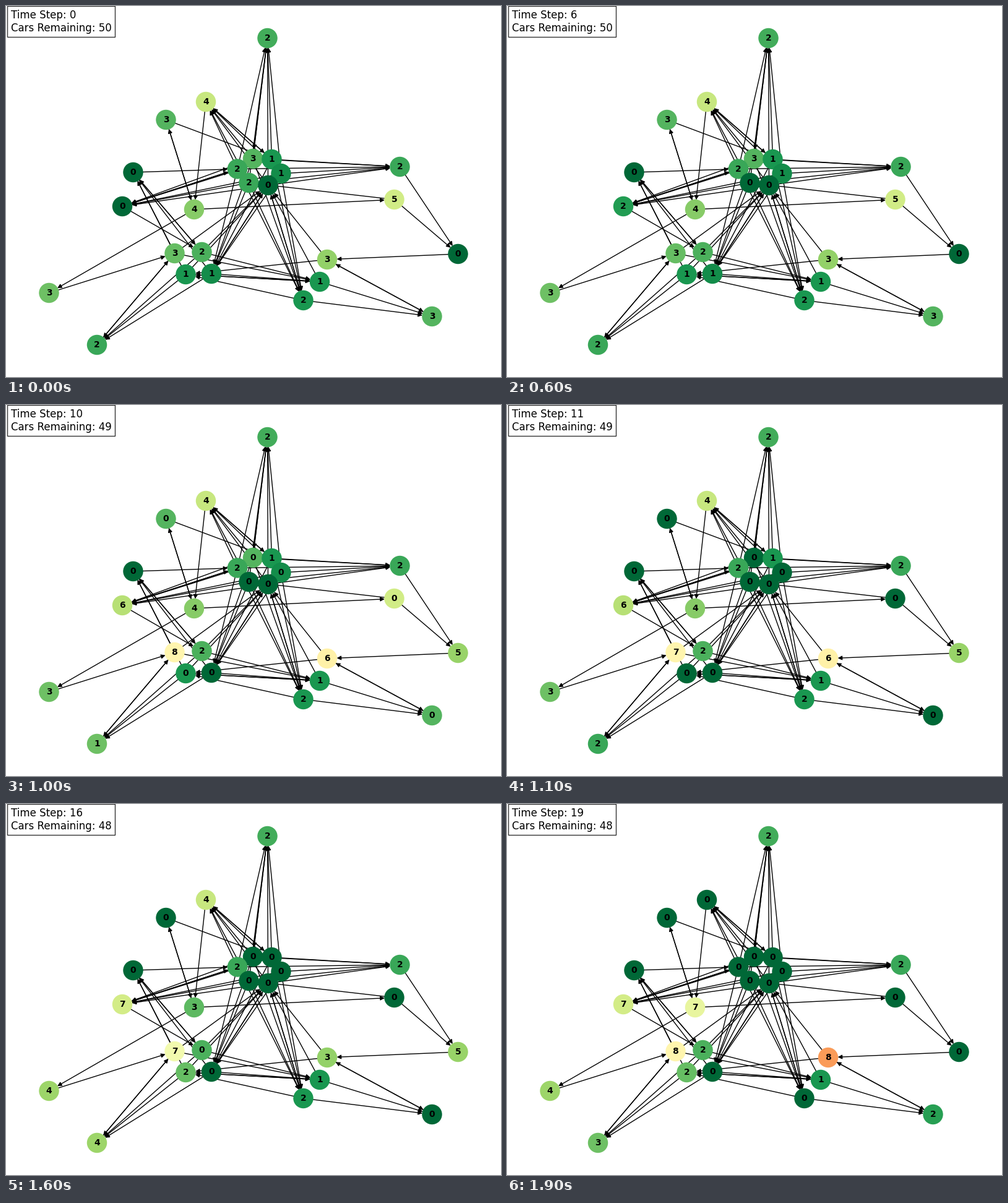
Recreate the animation shown at these times as a matplotlib script. Size 800x600 px, loop 2000 ms.

```python
import matplotlib.pyplot as plt
from matplotlib.animation import FuncAnimation
from matplotlib.patches import FancyArrowPatch

STEPS = 20
NODE_SIZE = 500

# name: (x, y, capacity, cars at the start)
NODES = {
    "A": (422.5, 52, 13, 2), "B": (323, 155, 11, 4),
    "C": (258.5, 184, 17, 3), "D": (205.5, 269, 10, 0),
    "E": (188, 324, 18, 0), "F": (304, 329, 16, 4),
    "G": (399, 247, 17, 3), "H": (429.5, 248, 10, 1),
    "I": (374, 263.5, 14, 2), "J": (444.5, 271, 13, 1),
    "K": (392.5, 286, 14, 2), "L": (423.5, 290, 10, 0),
    "M": (636.5, 260, 14, 2), "N": (627.5, 313, 13, 5),
    "O": (730.5, 401, 18, 0), "P": (519, 410, 11, 3),
    "Q": (507, 446, 10, 1), "R": (480.5, 476, 20, 2),
    "S": (688.5, 502, 17, 3), "T": (272.5, 400, 15, 3),
    "U": (316.5, 398, 12, 2), "V": (290.5, 434, 10, 1),
    "W": (332, 433, 13, 1), "X": (69.5, 464, 14, 3),
    "Y": (147, 548, 14, 2),
}

# sources -> targets, every source joined to every target
ROADS = [
    ("GHIJKL", "ABEMRW"), ("TUVW", "DYQL"), ("PQR", "SVL"),
    ("A", "G"), ("B", "HF"), ("C", "HF"), ("D", "IU"), ("E", "IU"),
    ("F", "CNX"), ("M", "O"), ("N", "OK"), ("O", "P"), ("S", "P"),
    ("X", "T"), ("Y", "T"),
]

# step: new car counts at the nodes that change
MOVES = {
    5: "K0 E2",
    7: "X0 T5",
    8: "W0 Y3",
    10: "C0 G0 J0 S0 N0 V0 E6 T8 X3 Y1 P6 O5",
    11: "T7 Y2",
    12: "F3 X4 P4 V1",
    14: "H0 E7",
    15: "P3 V2",
    16: "U0 Y4",
    18: "B0 I0 R0 O0 F7 U2 S2 P8 Y3 T8",
}


def run_model():
    cars = {name: node[3] for name, node in NODES.items()}
    states = []
    for step in range(STEPS):
        for move in MOVES.get(step, "").split():
            cars[move[0]] = int(move[1:])
        states.append(dict(cars))
    return states


def remaining(step):
    return 50 - (step >= 7) - (step >= 12)


def loads(step):
    # leaving cars still count towards the colour for one step
    now, before = STATES[step], STATES[max(step - 1, 0)]
    return [max(now[n], before[n]) / NODES[n][2] for n in NODES]


STATES = run_model()

fig = plt.figure(figsize=(8, 6), dpi=100, facecolor="white")
ax = fig.add_axes([0, 0, 1, 1])
ax.set_xlim(0, 800)
ax.set_ylim(600, 0)
ax.axis("off")

margin = NODE_SIZE ** 0.5 / 2
for sources, targets in ROADS:
    for a in sources:
        for b in targets:
            if a != b:
                ax.add_patch(FancyArrowPatch(
                    NODES[a][:2], NODES[b][:2], arrowstyle="-|>",
                    mutation_scale=10, shrinkA=margin, shrinkB=margin,
                    linewidth=1, color="black", zorder=1))

dots = ax.scatter([n[0] for n in NODES.values()],
                  [n[1] for n in NODES.values()],
                  s=NODE_SIZE, c=loads(0), cmap="RdYlGn_r",
                  vmin=0, vmax=1, linewidths=1, zorder=2)
labels = {name: ax.text(n[0], n[1], "", size=10, weight="bold",
                        ha="center", va="center", zorder=3)
          for name, n in NODES.items()}
info = ax.text(0.01, 0.99, "", transform=ax.transAxes, size=12, va="top",
               bbox=dict(facecolor="white", alpha=0.8), zorder=4)


def update(step):
    dots.set_array(loads(step))
    for name, label in labels.items():
        label.set_text(str(STATES[step][name]))
    info.set_text(f"Time Step: {step}\nCars Remaining: {remaining(step)}")
    return [dots, info, *labels.values()]


anim = FuncAnimation(fig, update, frames=STEPS, interval=100,
                     init_func=lambda: update(0), repeat=True, repeat_delay=0)
plt.show()
```
